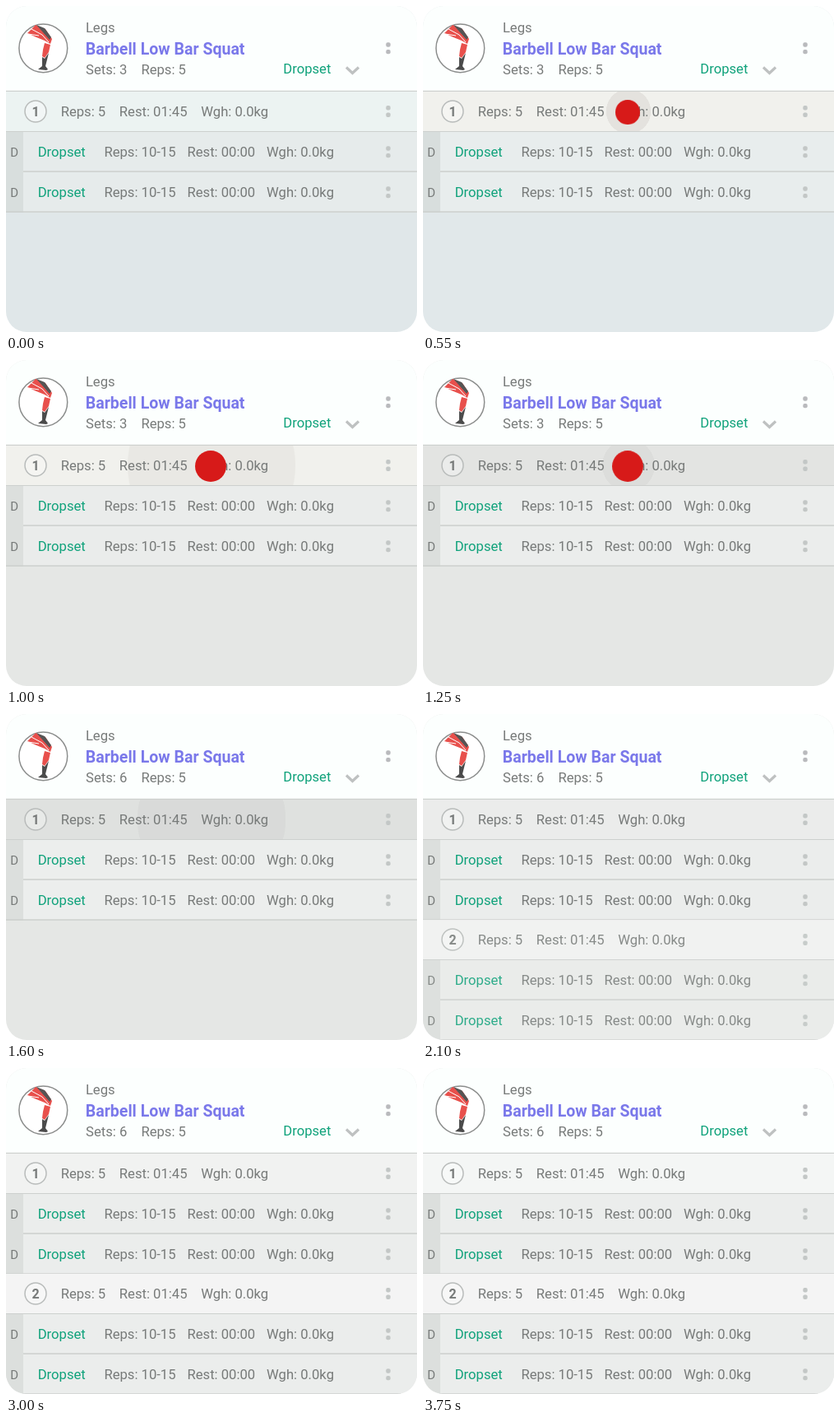
These frames come from a looping animation (500 by 396 pixels, 3.8 s). An HTML page:

```html
<!DOCTYPE html>
<html lang="en">
<head>
<meta charset="utf-8">
<title>Dropset</title>
<style>
html, body { margin: 0; width: 100%; height: 100%; overflow: hidden; background: #fff; }
svg { display: block; width: 500px; height: 396px; border-radius: 25px; }
text { font: 16.65px Roboto, sans-serif; fill: #777a79; }
.title { font-size: 19.55px; font-weight: 700; fill: #7a78ea; }
.drop { fill: #10a27b; }
.num { font-size: 16px; font-weight: 700; text-anchor: middle; }
.d { font-size: 15px; }
.menu { fill: #c3c7c6; }
.head .menu { fill: #b9babd; }
.line { fill: #cdd0ce; }
.page, .sub, .strip, .first, .tap, .ripple, .three, .six, .added {
  animation: 3.8s linear infinite;
}
.page { animation-name: page; }
.sub { animation-name: sub; }
.strip { animation-name: strip; }
.first { animation-name: first; }
.second { fill: #f4f4f4; }
.added { animation-name: added; }
.three { animation-name: three; }
.six { animation-name: six; }
.tap { transform-origin: 249px 129px; animation-name: tap; }
.ripple { transform-origin: 250px 128px; fill: #3a2a1c; }
.r1 { animation-name: press; }
.r2 { fill: #222; animation-name: again; }

@keyframes page { 0%, 10% { fill: #e0e7e9; } 15% { fill: #e1e8ea; } 26%, 100% { fill: #e5e7e5; } }
@keyframes sub { 0%, 10% { fill: #e6ebeb; } 15% { fill: #e8eded; } 26% { fill: #eaeceb; } 42% { fill: #eceeed; } 55%, 100% { fill: #ebedec; } }
@keyframes strip { 0%, 15% { fill: #d8dedd; } 26%, 100% { fill: #dcdfdd; } }
@keyframes first {
  0%, 10.5% { fill: #ecf3f2; }
  14.4%, 28.5% { fill: #f1f1ed; }
  34%, 43% { fill: #dfe1df; }
  55.2% { fill: #ebeceb; }
  71%, 85% { fill: #f1f2f1; }
  98%, 100% { fill: #f4f6f5; }
}
@keyframes press {
  0%, 10.26% { transform: scale(0); opacity: .07; }
  14.47% { transform: scale(.27); opacity: .07; }
  26.32% { transform: scale(1.02); opacity: .04; }
  30%, 100% { transform: scale(1.25); opacity: 0; }
}
@keyframes again {
  0%, 27.9% { transform: scale(0); opacity: .035; }
  42.1% { transform: scale(.9); opacity: .035; }
  46.5%, 100% { transform: scale(1.18); opacity: 0; }
}
@keyframes tap {
  0%, 10.5% { transform: scale(0); }
  14.47% { transform: scale(.79); }
  15.8%, 32.9% { transform: scale(1); }
  36.8%, 100% { transform: scale(0); }
}
@keyframes three { 0%, 36.8% { opacity: 1; } 36.81%, 100% { opacity: 0; } }
@keyframes six { 0%, 36.8% { opacity: 0; } 36.81%, 100% { opacity: 1; } }
@keyframes added { 0%, 45% { opacity: 0; } 57% , 100% { opacity: 1; } }
</style>
</head>
<body>
<svg id="stage" viewBox="0 0 500 396"></svg>
<script>
const text = (x, y, s, cls = '') => `<text class="${cls}" x="${x}" y="${y}">${s}</text>`;
const rect = (x, y, w, h, cls) => `<rect class="${cls}" x="${x}" y="${y}" width="${w}" height="${h}"/>`;
const menu = y => [-4.3, 4.3].map(d =>
  `<rect class="menu" x="462.3" y="${y + d - 2.7}" width="5.4" height="5.4" rx="2"/>`).join('');

const ripples = ['r1', 'r2'].map(c =>
  `<circle class="ripple ${c}" cx="250" cy="128" r="100"/>`).join('');

function setRow(top, n, cls, extra = '') {
  const y = top + 24;
  return rect(0, top, 500, 49, cls) + extra + rect(0, top + 48, 500, 1.5, 'line') +
    `<circle cx="36" cy="${y}" r="13" fill="#fff" fill-opacity=".3" stroke="#b9bcbb" stroke-width="1.5"/>` +
    text(36, y + 5.8, n, 'num') +
    text(66.7, y + 6, 'Reps: 5') + text(137.8, y + 6, 'Rest: 01:45') +
    text(237.3, y + 6, 'Wgh: 0.0kg') + menu(y);
}

function dropRow(top, last) {
  const y = top + 24.3;
  return rect(21, top, 479, 49, 'sub') + rect(0, top, 21, 49, 'strip') +
    rect(last ? 0 : 21, top + 47.3, 500, 1.5, 'line') +
    text(5.2, y + 5.3, 'D', 'd') + text(38.7, y + 6, 'Dropset', 'drop') +
    text(119.4, y + 6, 'Reps: 10-15') + text(220.5, y + 6, 'Rest: 00:00') +
    text(317.1, y + 6, 'Wgh: 0.0kg') + menu(y);
}

const leg = `
  <circle cx="45.3" cy="51.3" r="29.4" fill="#fff" stroke="#8b8d8c" stroke-width="1.5"/>
  <path d="M26 33 36 23 48 28 56 40 54 46 47 42 37 38Z" fill="#e8504c"/>
  <path d="M47 45 54 47 52 56 47 63 44 61 45 53Z" fill="#e8504c"/>
  <path d="M31 28 44 35 52 44M27 34 40 36" fill="none" stroke="#fff" stroke-width="1"/>
  <path d="M37 23 47 27 55 38 53 41 45 32Z" fill="#555"/>
  <path d="M44 62 47 64 52 57 48 73 51 77 49 78 39 77 44 73Z" fill="#4b4b4b"/>`;

const header = `<g class="head"><rect width="500" height="103" fill="#fcfffe"/>
  ${rect(0, 102.8, 500, 1.5, 'line')}
  ${leg}
  ${text(96.9, 32, 'Legs')}
  ${text(96.8, 58.5, 'Barbell Low Bar Squat', 'title')}
  ${text(97, 83, 'Sets: 3', 'three')}${text(97, 83, 'Sets: 6', 'six')}
  ${text(164.4, 83, 'Reps: 5')}
  ${text(337.3, 82, 'Dropset', 'drop')}
  <path d="M414 74.5 421.5 81.5 429 74.5" fill="none" stroke="#bec1c1" stroke-width="3.2"/>
  ${menu(51.3)}</g>`;

document.getElementById('stage').innerHTML =
  '<defs><clipPath id="row"><path d="M0 104H500V152H0Z"/></clipPath></defs>' +
  rect(0, 0, 500, 396, 'page') + header +
  setRow(104, 1, 'first', `<g clip-path="url(#row)">${ripples}</g>`) +
  dropRow(153) + dropRow(202, true) +
  `<g class="added">${setRow(250, 2, 'second')}${dropRow(299)}${dropRow(348)}</g>` +
  '<circle class="tap" cx="249" cy="129" r="19" fill="#d71a19"/>';
</script>
</body>
</html>
```
